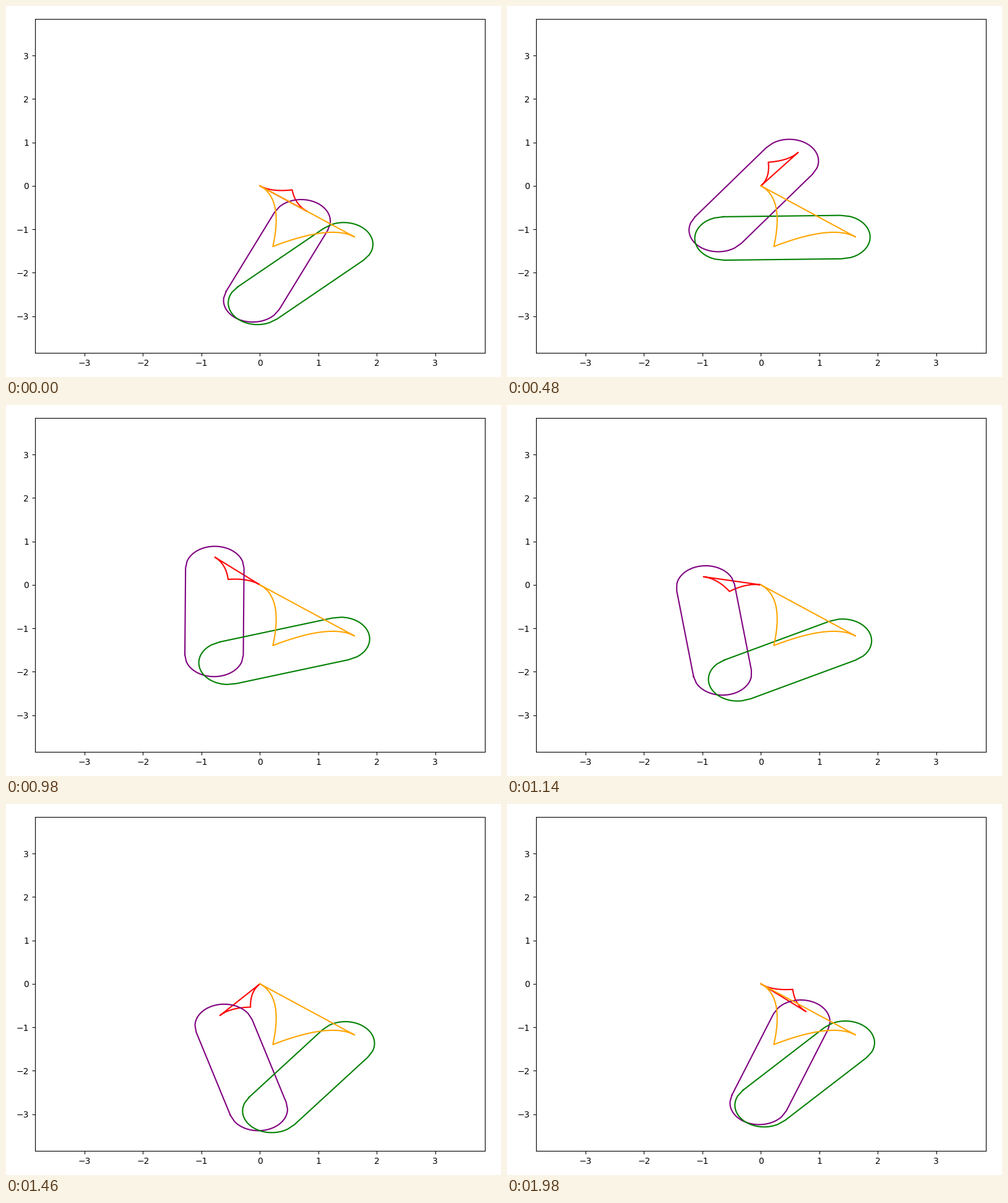
These frames come from a looping animation (800x600 px, 2 s). A matplotlib script:

```python
import numpy as np
import matplotlib.pyplot as plt
from matplotlib.animation import FuncAnimation

W, H, DPI = 800, 600, 100
FRAMES, INTERVAL = 100, 20
LIMIT = 3.85
BASE_ANGLE = -np.pi / 5
CRANK, BAR, GROUND = 1.0, 2.5, 2.0


def horn(length, side):
    """Straight edge closed by two parabolas meeting in a peak."""
    x = np.linspace(0, length, 101)
    y = side * np.minimum(x, length - x) ** 2
    return np.append(x, 0) + 1j * np.append(y, 0)


def slot(length, radius=0.5, inset=0.25):
    """Rounded bar whose caps are sampled evenly across its width."""
    v = np.linspace(-radius, radius, 40)
    bulge = np.sqrt(np.maximum(radius**2 - v**2, 0))
    right = length - inset + bulge + 1j * v
    left = inset - bulge - 1j * v
    return np.concatenate([right, left, right[:1]])


def unit(z):
    return z / abs(z)


def place(line, shape, origin, direction):
    pts = origin + shape * direction
    line.set_data(pts.real, pts.imag)


fig, ax = plt.subplots(figsize=(W / DPI, H / DPI), dpi=DPI)
# Margins are fitted to the default 0..1 axes, before the limits change.
fig.tight_layout()
ax.set_xlim(-LIMIT, LIMIT)
ax.set_ylim(-LIMIT, LIMIT)
ax.set_xticks(range(-3, 4))
ax.set_yticks(range(-3, 4))

crank, coupler, rocker, ground = (
    ax.plot([], [], color=c, lw=1.5)[0]
    for c in ("red", "purple", "green", "orange")
)
crank_shape = horn(CRANK, 1)
bar_shape = slot(BAR)
base = np.exp(1j * BASE_ANGLE)
pivot = GROUND * base
place(ground, horn(GROUND, -1), 0, base)


def update(i):
    turn = np.exp(1j * (BASE_ANGLE + 2 * np.pi * i / FRAMES))
    tip = CRANK * turn
    span = pivot - tip
    # Equal bars: the joint lies on the perpendicular bisector.
    height = np.sqrt(BAR**2 - abs(span) ** 2 / 4)
    joint = tip + span / 2 - 1j * unit(span) * height

    place(crank, crank_shape, 0, turn)
    place(coupler, bar_shape, tip, unit(joint - tip))
    place(rocker, bar_shape, pivot, unit(joint - pivot))
    return crank, coupler, rocker


anim = FuncAnimation(fig, update, frames=FRAMES, interval=INTERVAL,
                     repeat=True, repeat_delay=0, blit=False)
plt.show()
```
